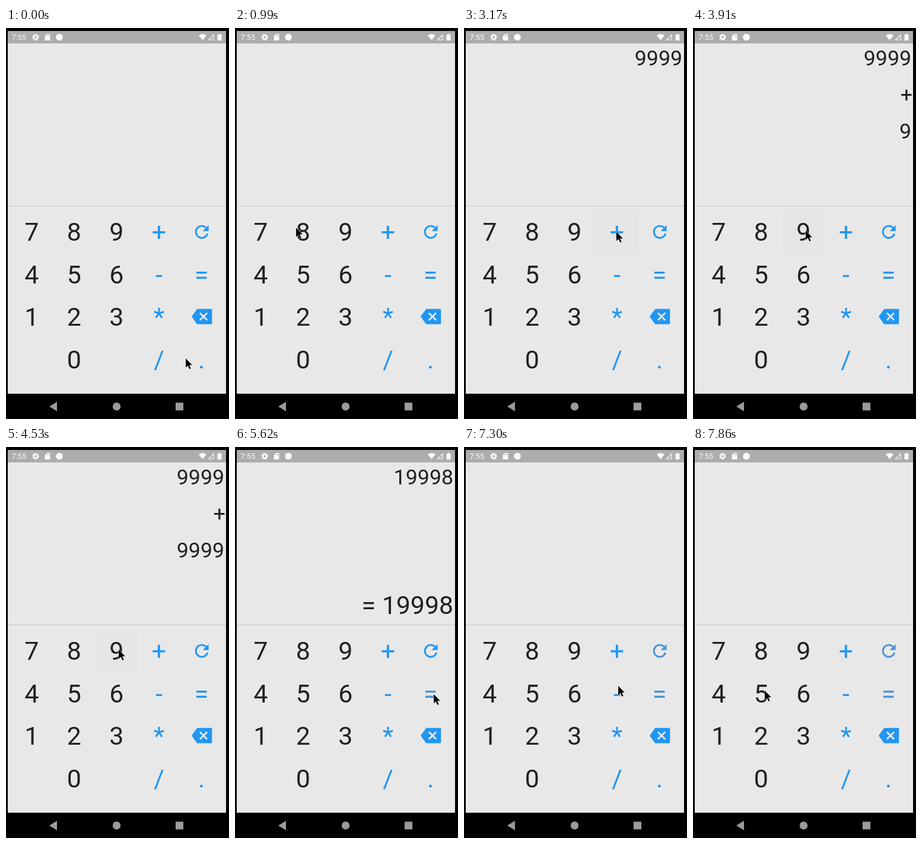
These frames come from a looping animation (376 px wide and 658 px high, 8 s). An HTML page:

```html
<!DOCTYPE html>
<html lang="en">
<head>
<meta charset="utf-8">
<title>Calculator</title>
<style>
html, body { margin: 0; width: 100%; height: 100%; overflow: hidden; background: #000; }
svg { display: block; font-family: Roboto, Arial, sans-serif; }
#keys { font-size: 42.9px; text-anchor: middle; }
#screen { font-size: 35.8px; text-anchor: end; fill: #212121; }
#screen .total { font-size: 42.9px; }
</style>
</head>
<body>
<svg width="376" height="658" viewBox="0 0 376 658">
  <rect width="376" height="658"/>
  <rect x="3" y="5" width="368" height="610.5" fill="#e8e8e8"/>
  <rect x="3" y="5" width="368" height="21" fill="#adadad"/>
  <rect x="3" y="299" width="368" height="1" fill="#c6c6c6"/>

  <g id="status" fill="#fafafa">
    <text x="9.5" y="20" font-size="12.8">7:55</text>
    <g fill="none" stroke="#fafafa">
      <circle cx="50" cy="15.5" r="3.2" stroke-width="2.6"/>
      <circle cx="50" cy="15.5" r="5" stroke-width="1.6" stroke-dasharray="2 1.927"/>
    </g>
    <path d="M69 10h5.5v11h-9v-7.5z"/>
    <path d="M69.2 11.5v2.5m2-2.5v2.5m2-2.5v2.5" stroke="#adadad" stroke-width=".9"/>
    <circle cx="90" cy="15.5" r="5.8"/>
    <path d="M331.5 20.5l-6.5-8q6.500-5 13 0z"/>
    <path d="M350 11.500V20h-8.500z" fill="none" stroke="#fafafa" stroke-width="1.2"/>
    <path d="M358.500 10h3v1.200h2V21h-7v-9.800h2z"/>
  </g>

  <rect id="press" width="71.5" height="72" fill="#e6e6e6"/>
  <circle id="ripple"/>
  <g id="keys"></g>

  <g id="reset" transform="translate(313 326) scale(1.43)" fill="#2196f3" stroke="#2196f3">
    <path d="M16.950 7.050A7 7 0 1 0 18.700 14" fill="none" stroke-width="2"/>
    <path d="M20 4v7h-7z" stroke="none"/>
  </g>
  <g transform="translate(313 468.5) scale(1.43)" stroke-width="2">
    <path d="M7 4h16v16H7L1.200 12z" fill="#2196f3" stroke="#2196f3" stroke-linejoin="round"/>
    <path d="M9.700 7.700l8.600 8.600m0-8.600l-8.600 8.600" stroke="#e8e8e8"/>
  </g>

  <g id="screen">
    <text x="368.2" y="63"></text>
    <text x="370" y="125"></text>
    <text x="368.2" y="186"></text>
    <text x="368.2" y="281" class="total"></text>
  </g>

  <g id="nav" fill="#9b9b9b">
    <path d="M73 637l13-8v16z"/>
    <circle cx="186.5" cy="637" r="6.7"/>
    <rect x="286" y="630.5" width="13" height="13"/>
  </g>
  <path id="cursor" d="M0 0v15.500l3.600-3.300 2.700 5.800 2.400-1-2.600-5.700H11z" stroke="#fff" paint-order="stroke"/>
</svg>
<script>
const LOOP = 8000, DELAY = 70, HOLD = 300;
const BLUE = '#2196f3', WORN = '#4794da';
const $ = id => document.getElementById(id);

function set(el, attrs) {
  for (const name in attrs) el.setAttribute(name, attrs[name]);
}

// Keypad rows; C and < are drawn as icons
const cells = {};
['789+C', '456-=', '123*<', ' 0 /.'].forEach((row, r) => [...row].forEach((key, c) => {
  const x = 43.2 + 71.6 * c, y = Math.floor(358.5 + 71.5 * r);
  cells[key] = { x, y };
  if (' C<'.includes(key)) return;
  const label = document.createElementNS('http://www.w3.org/2000/svg', 'text');
  label.textContent = key;
  set(label, { x, y, fill: c > 2 ? BLUE : '#212121' });
  $('keys').append(label);
  cells[key].label = label;
}));

// Pointer moves: start, end, x, y
const home = [303, 556];
const moves = [
  [690, 940, 63, 333],
  [940, 1070, 181, 343],
  [2850, 3100, 257, 343],
  [3400, 3640, 190, 341],
  [4780, 5060, 335, 416],
  [6520, 6720, 331, 345],
  [7100, 7300, 260, 402],
  [7300, 7860, 121, 410]
];

// Bursts of taps: key, count, first time, gap
const taps = [
  ['9', 2, 1400, 220],
  ['9', 2, 2030, 250],
  ['+', 1, 3150, 0],
  ['9', 4, 3690, 190],
  ['=', 1, 5110, 0],
  ['C', 1, 6800, 0]
].flatMap(([key, count, first, gap]) =>
  Array.from({ length: count }, (_, i) => ({ key, time: first + i * gap })));

const clamp = k => Math.min(1, Math.max(0, k));
const ease = k => k * k * (3 - 2 * k);

function pointerAt(t) {
  let [x, y] = home;
  for (const [start, end, toX, toY] of moves) {
    const k = ease(clamp((t - start) / (end - start)));
    x += (toX - x) * k;
    y += (toY - y) * k;
  }
  return [Math.round(x), Math.round(y)];
}

function linesAt(t) {
  let left = '', op = '', right = '', total = '';
  for (const { key, time } of taps) {
    if (time + DELAY > t) break;
    if (key === '9') op ? right += key : left += key;
    else if (key === '+') op = key;
    else if (key === '=') {
      left = String(+left + +right);
      total = '= ' + left;
      op = right = '';
    } else left = op = right = total = '';
  }
  return [left, op, right, total];
}

function drawTap(t) {
  const tap = taps.findLast(({ time }) => time <= t);
  const age = tap ? t - tap.time : HOLD;
  const active = age < HOLD;
  set($('press'), { opacity: +active });
  set($('ripple'), { opacity: 0.06 * (1 - clamp(age / HOLD)) });
  if (!active) return;
  const { x, y } = cells[tap.key], [cx, cy] = pointerAt(tap.time);
  set($('press'), { x: x - 36, y: y - 50 });
  set($('ripple'), { cx, cy, r: 13 * age / HOLD });
}

function draw(t) {
  const [x, y] = pointerAt(t);
  set($('cursor'), { transform: `translate(${x} ${y})` });
  linesAt(t).forEach((line, i) => { $('screen').children[i].textContent = line; });
  drawTap(t);

  // Pressed blue keys stay slightly dull
  const tint = key => taps.some(tap => tap.key === key && tap.time <= t) ? WORN : BLUE;
  set(cells['='].label, { fill: tint('=') });
  set($('reset'), { fill: tint('C'), stroke: tint('C') });
}

const start = performance.now();
function frame() {
  draw((performance.now() - start) % LOOP);
  requestAnimationFrame(frame);
}
frame();
</script>
</body>
</html>
```
